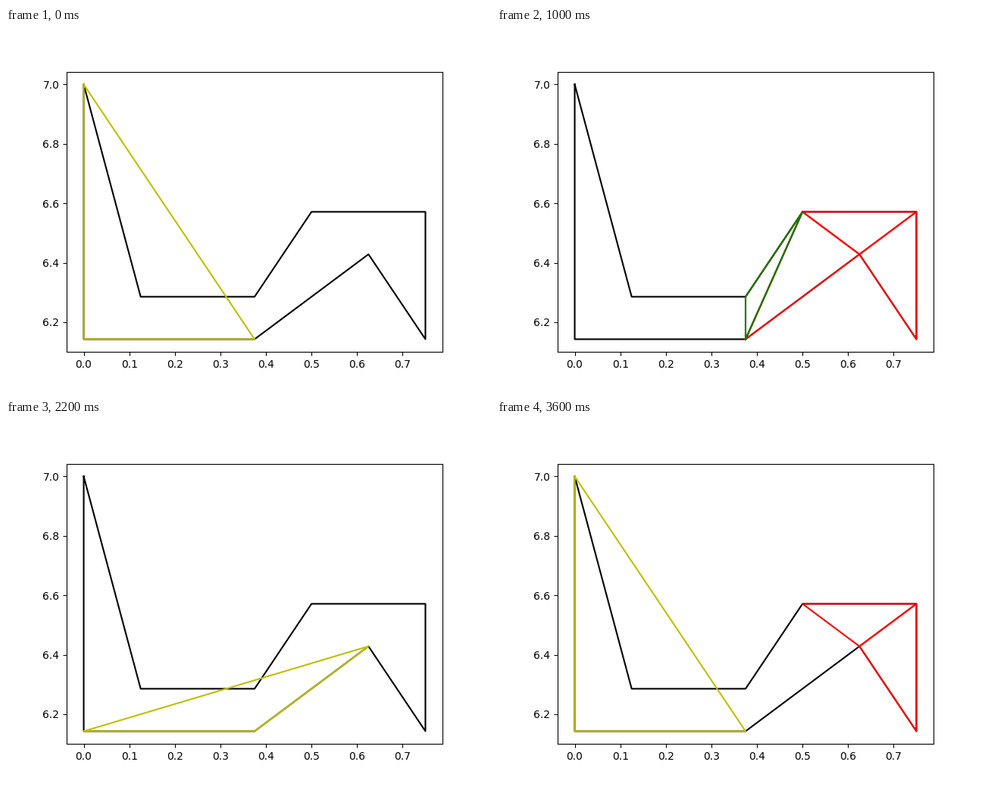
A matplotlib script that plays this animation: 640 px wide and 480 px high, repeating every 3.8 s.

```python
import matplotlib.pyplot as plt
from matplotlib.animation import FuncAnimation

# Polygon corners on a grid of eighths by sevenths, counter-clockwise.
GRID = [(0, 49), (0, 43), (3, 43), (5, 45), (6, 43),
        (6, 46), (4, 46), (3, 44), (1, 44)]
POLYGON = [(x / 8, y / 7) for x, y in GRID]


def cross(a, b, c):
    return (b[0] - a[0]) * (c[1] - a[1]) - (b[1] - a[1]) * (c[0] - a[0])


def inside(p, tri):
    a, b, c = tri
    return min(cross(a, b, p), cross(b, c, p), cross(c, a, p)) > 1e-9


def is_ear(tri, points):
    return cross(*tri) > 1e-9 and not any(inside(p, tri) for p in points)


def clip_ears(points):
    """Return one (clipped triangles, candidate, accepted) entry per test."""
    points, clipped, steps = list(points), [], []
    while len(points) >= 3:
        for i in range(len(points) - 2):
            tri = points[i:i + 3]
            ear = is_ear(tri, points)
            if ear:
                clipped.append(tri)
            steps.append((list(clipped), tri, ear))
            if ear:
                del points[i + 1]
                break
        else:
            break
    return steps


def closed(points):
    xs, ys = zip(*points, points[0])
    return xs, ys


STEPS = clip_ears(POLYGON)
# Steps are played in alphabetical order of their numbers: 1, 10, 11, ..., 2, 3, ...
ORDER = sorted(range(1, len(STEPS) + 1), key=str)

fig, ax = plt.subplots(figsize=(6.4, 4.8), dpi=100)
ax.plot(*closed(POLYGON), "k")
# Reading the limits applies the pending autoscale; setting them keeps it fixed.
ax.set(xlim=ax.get_xlim(), ylim=ax.get_ylim())
ears = [ax.plot([], [], "r")[0] for _ in range(len(POLYGON) - 2)]
probe, = ax.plot([], [], "y")


def update(frame):
    clipped, tri, ear = STEPS[ORDER[frame] - 1]
    for k, line in enumerate(ears):
        if k < len(clipped):
            line.set_data(*closed(clipped[k]))
        else:
            line.set_data([], [])
    probe.set_data(*closed(tri))
    probe.set_color("g" if ear else "y")
    return [*ears, probe]


anim = FuncAnimation(fig, update, frames=len(ORDER), interval=200,
                     repeat=True, repeat_delay=0)
plt.show()
```
